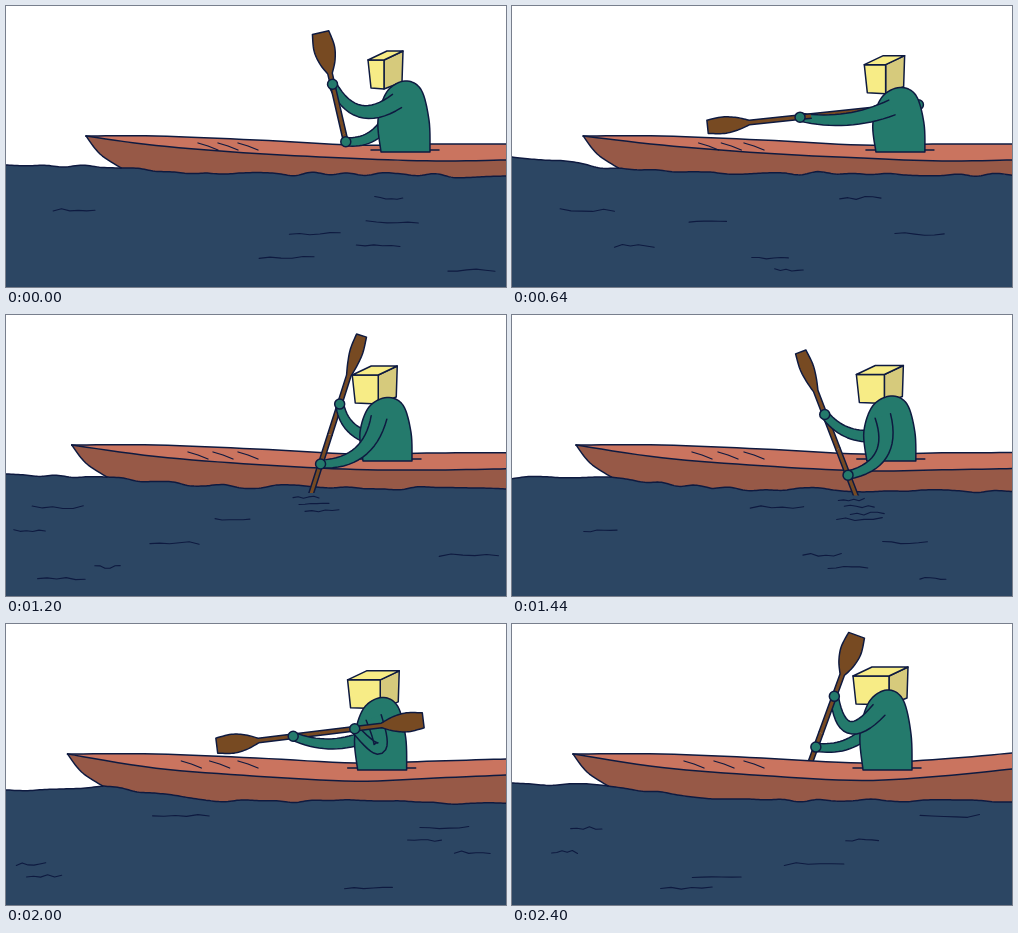
An HTML page with a canvas that plays this animation: 500x281 px, repeating every 2.48 s.

```html
<!DOCTYPE html>
<html lang="en">
<head>
<meta charset="utf-8">
<title>Kayak</title>
<style>
html, body { margin: 0; width: 100%; height: 100%; overflow: hidden; background: #fff; }
canvas { display: block; width: 100vw; height: 100vh; }
</style>
</head>
<body>
<canvas id="stage" width="500" height="281"></canvas>
<script>
const ctx = document.getElementById('stage').getContext('2d');
const STEP = 80, STEPS = 31;
const INK = '#0e1a40', WATER = '#2c4663', DECK = '#ca745f', HULL = '#975947',
  TEAL = '#247a6c', WOOD = '#774a22', LIGHT = '#f7ec86', SHADE = '#d6ca7c';
const HALF_PADDLE = 104;

// Paddle stroke: step, centre x, centre y, angle in degrees, near grip, far grip
const STROKE = [
  [0, 338, 128, 103, 51, 8],
  [4, 322, 103, 147, 19, 36],
  [8, 299, 110, 186, 11, 108],
  [12, 318, 103, 219, 32, 35],
  [18, 326, 134, 291, 28, 37],
  [25, 314, 109, 367, 35, 27],
  [30, 309, 109, 430, 39, 15]];

const lerp = (a, b, u) => a + (b - a) * u;

function noise(a, b) {
  const v = Math.sin(a * 127.1 + b * 311.7) * 43758.5453;
  return v - Math.floor(v);
}

// Catmull-Rom between rows k and k + 1
function between(rows, k, u) {
  const row = i => rows[Math.max(0, Math.min(rows.length - 1, i))];
  const before = row(k - 1), next = row(k + 1), after = row(k + 2);
  return row(k).map((b, n) => {
    const a = before[n], c = next[n], d = after[n];
    return b + u / 2 * (c - a + u * (2 * a - 5 * b + 4 * c - d + u * (3 * (b - c) + d - a)));
  });
}

function smooth(points) {
  const out = [];
  for (let k = 0; k < points.length - 1; k++) {
    for (let u = 0; u < 1; u += 0.125) out.push(between(points, k, u));
  }
  return [...out, points[points.length - 1]];
}

function trace(points, closed) {
  const path = new Path2D();
  points.forEach(p => path.lineTo(...p));
  if (closed) path.closePath();
  return path;
}

function fill(points, color) {
  ctx.fillStyle = color;
  ctx.fill(trace(points));
}

function line(points, width = 1.5, closed = false) {
  ctx.strokeStyle = INK;
  ctx.lineWidth = width;
  ctx.stroke(trace(points, closed));
}

function shape(points, color) {
  fill(points, color);
  line(points, 1.5, true);
}

// Uneven water edge from (x1, y1) to (x2, y2), redrawn on every step
function waterEdge(x1, y1, x2, y2, seed) {
  const count = Math.round((x2 - x1) / 18), points = [];
  for (let i = 0; i <= count; i++) {
    const bump = i > 0 && i < count ? (noise(i, seed) - 0.5) * 4 : 0;
    points.push([lerp(x1, x2, i / count), lerp(y1, y2, i / count) + bump]);
  }
  return smooth(points);
}

// Everything that moves, from the step alone
function poseAt(step) {
  const p = step / 30, rest = (1 - p) ** 2;
  const swell = Math.sin(2 * Math.PI * p), lean = Math.sin(Math.PI * p);
  let k = 0;
  while (k < STROKE.length - 2 && step >= STROKE[k + 1][0]) k++;
  const u = (step - STROKE[k][0]) / (STROKE[k + 1][0] - STROKE[k][0]);
  const [, x, y, degrees, nearGrip, farGrip] = between(STROKE, k, u);
  const angle = degrees * Math.PI / 180;
  return {
    p, step,
    onPaddle: r => [x + r * Math.cos(angle), y - r * Math.sin(angle)],
    nearGrip, farGrip,
    bladeWidth: 8.5 + 2 * Math.cos(2 * Math.PI * p),
    bodyX: 375 + 24 * rest, bodyTop: 75 - 9 * p + 12 * lean,
    headX: 341 + 21 * rest, headY: 54 - 2 * p + 7 * lean, faceWidth: 16 + 20 * p,
    bowX: 61 + 19 * rest, keel: 169 + 8 * p - 3 * swell,
    sea: 159 - 8 * swell, stern: -9 * p ** 6
  };
}

function drawHalfPaddle(pose, side) {
  const [x, y] = pose.onPaddle(side * HALF_PADDLE), [midX, midY] = pose.onPaddle(0);
  const w = pose.bladeWidth;
  const edge = smooth([[0, w * 0.8], [16, w], [30, w * 0.75], [42, 2.3]]);
  const outline = [[HALF_PADDLE, -2.3], ...edge.map(([a, b]) => [a, -b]).reverse(),
    ...edge, [HALF_PADDLE, 2.3]];
  ctx.save();
  ctx.translate(x, y);
  ctx.rotate(Math.atan2(midY - y, midX - x));
  fill(outline, WOOD);
  line(outline);
  ctx.restore();
}

function drawHand([x, y], radius) {
  ctx.beginPath();
  ctx.arc(x, y, radius, 0, 7);
  ctx.fillStyle = TEAL;
  ctx.fill();
  ctx.stroke();
}

// Tapered arm whose elbow drops further the nearer the hand comes
function drawArm([sx, sy], [hx, hy], thick, length) {
  const dx = hx - sx, dy = hy - sy, d = Math.hypot(dx, dy) || 1;
  const bend = Math.max(14, 0.7 * Math.sqrt(Math.max(0, length * length - d * d)));
  const ex = (sx + hx) / 2 + dy / d * bend, ey = (sy + hy) / 2 - dx / d * bend;
  const upper = [], lower = [];
  for (let i = 0; i <= 16; i++) {
    const u = i / 16;
    const x = lerp(lerp(sx, ex, u), lerp(ex, hx, u), u);
    const y = lerp(lerp(sy, ey, u), lerp(ey, hy, u), u);
    const a = Math.atan2(lerp(ey - sy, hy - ey, u), lerp(ex - sx, hx - ex, u));
    const r = lerp(thick, 4, u);
    upper.push([x + r * Math.sin(a), y - r * Math.cos(a)]);
    lower.unshift([x - r * Math.sin(a), y + r * Math.cos(a)]);
  }
  fill([...upper, ...lower], TEAL);
  line([...upper, ...lower]);
}

function drawBoat({ p, step, bowX, keel, sea, stern }) {
  const bow = [bowX, 130], foot = [bowX + 35, 162];
  const ride = (keel - 172) / 2;
  const top = smooth([bow, [150, 130], [250, 134], [350, 139], [430, 138 + stern / 3], [500, 138 + stern]]);
  const side = smooth([bow, [150, 141 + ride], [250, 149 + ride], [350, 154 + ride],
    [430, 155 + stern / 3], [500, 154 + stern]]);
  const stem = smooth([bow, [bowX + 14, 148], foot]);
  const bottom = [...waterEdge(...foot, 200, keel - 2, step),
    ...waterEdge(200, keel - 2, 500, keel + 1, step + 40)];
  const shore = waterEdge(0, sea, ...foot, step + 80);
  const sideBack = [...side].reverse();

  fill([...shore, ...bottom, [500, 281], [0, 281]], WATER);
  fill([...stem, ...bottom, ...sideBack], HULL);
  fill([...top, ...sideBack], DECK);
  [top, side, stem, shore, bottom].forEach(edge => line(edge));
  for (let i = 0; i < 3; i++) {
    const x = 192 - 20 * p + i * (20 + 10 * p);
    line([[x, 137], [x + 10, 140], [x + 20, 144]], 1.3);
  }
}

function drawRipple(x, y, length, seed) {
  const points = [];
  for (let i = 0; i <= 5; i++) {
    points.push([x + length * i / 5, y + (noise(i, seed) - 0.5) * 3]);
  }
  line(points, 1.1);
}

function drawRipples({ step, keel, onPaddle }) {
  const scene = Math.floor(step / 3);
  for (let i = 0; i < 7; i++) {
    const seed = scene * 10 + i;
    drawRipple(noise(seed, 1) * 450, 192 + i * 12, 25 + noise(seed, 2) * 35, seed);
  }
  const [x, y] = onPaddle(HALF_PADDLE);
  if (y > keel) {
    const [midX, midY] = onPaddle(0);
    const entry = lerp(midX, x, (keel + 6 - midY) / (y - midY));
    for (let i = 0; i < 3; i++) drawRipple(entry - 18 + i * 6, keel + 9 + i * 7, 26 + i * 4, step + i);
  }
}

function drawHead({ headX: x, headY: y, faceWidth: w }) {
  const h = 29, right = x + w;
  shape([[right, y], [right + 19, y - 9], [right + 18, y + h - 7], [right, y + h]], SHADE);
  shape([[x, y], [right, y], [right, y + h], [x + 3, y + h - 1]], LIGHT);
  shape([[x, y], [x + 19, y - 9], [right + 19, y - 9], [right, y]], LIGHT);
}

function drawBody({ bodyX: x, bodyTop: top }) {
  const base = 146, height = base - top;
  line([[x - 34, base - 2], [x + 34, base - 2]]);
  const outline = [[-24, 1], [-27, 0.55], [-18, 0.15], [0, 0], [16, 0.12], [24, 0.55], [25, 1]];
  shape(smooth(outline.map(([dx, v]) => [x + dx, top + height * v])), TEAL);
}

function draw(step) {
  const pose = poseAt(step), { bodyX, bodyTop } = pose;
  const nearHand = pose.onPaddle(pose.nearGrip), farHand = pose.onPaddle(-pose.farGrip);
  ctx.fillStyle = '#fff';
  ctx.fillRect(0, 0, 500, 281);
  ctx.lineJoin = ctx.lineCap = 'round';

  drawHalfPaddle(pose, -1);
  drawBoat(pose);
  drawRipples(pose);
  drawArm([bodyX - 18, bodyTop + 40], farHand, 6, 40);
  drawHand(farHand, 5);
  drawHead(pose);
  drawBody(pose);
  drawArm([bodyX - 8, bodyTop + 20], nearHand, 8, 86);

  // The near blade disappears below the water
  ctx.save();
  ctx.beginPath();
  ctx.rect(0, 0, 500, pose.keel + 5);
  ctx.clip();
  drawHalfPaddle(pose, 1);
  ctx.restore();
  drawHand(nearHand, 5);
}

function tick() {
  draw(Math.floor(performance.now() / STEP) % STEPS);
  requestAnimationFrame(tick);
}
tick();
</script>
</body>
</html>
```
